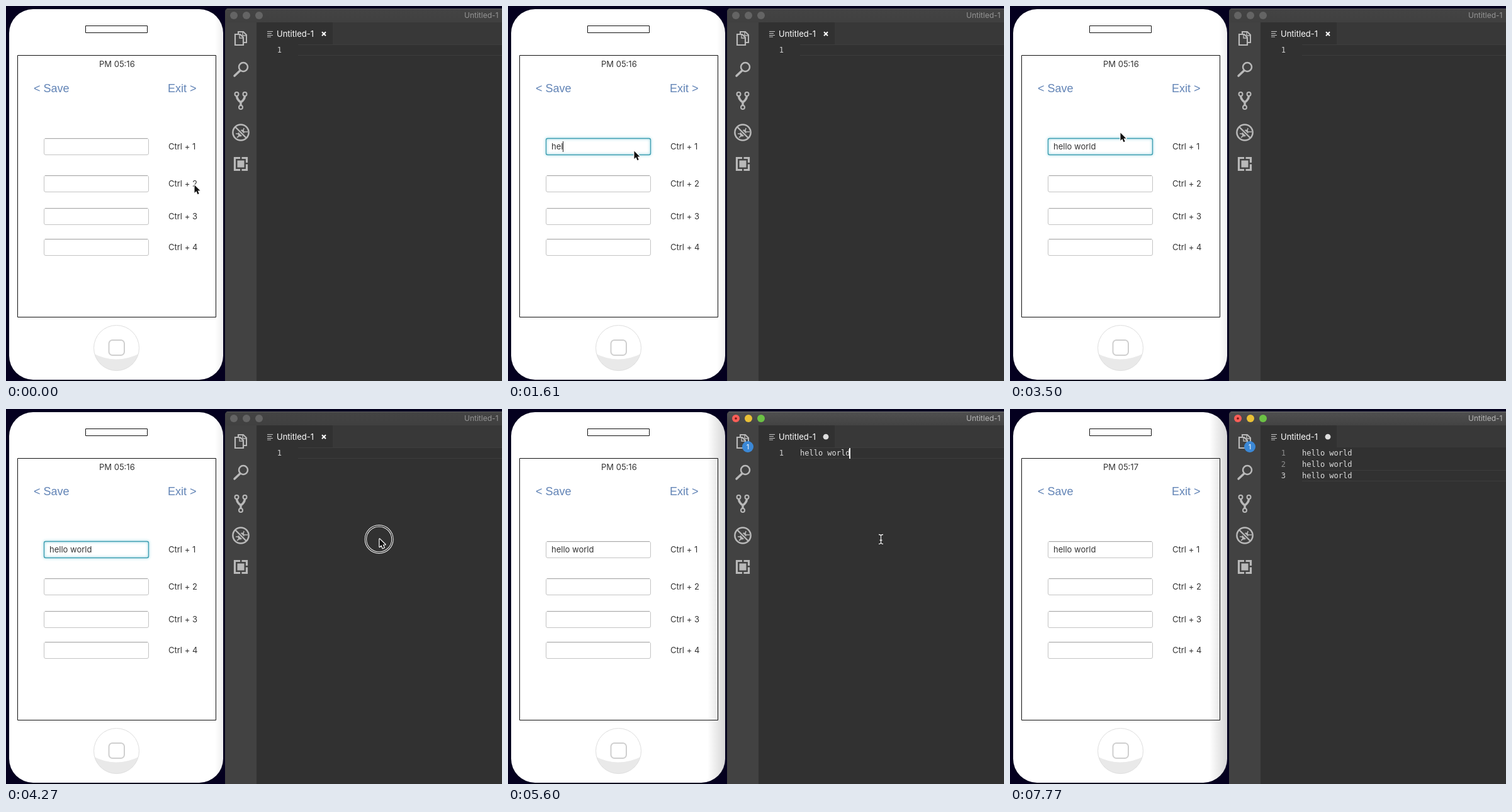
Write an HTML page with a canvas that moves like this. It is 788 px wide and 596 px high and loops after 7.84 s.

```html
<!DOCTYPE html>
<html lang="en">
<head>
<meta charset="utf-8">
<title>Text macro demo</title>
<style>
  html, body { margin: 0; width: 100%; height: 100%; overflow: hidden; background: #04001f; }
  canvas { display: block; }
</style>
</head>
<body>
<canvas id="stage" width="788" height="596"></canvas>
<script>
const ctx = document.getElementById('stage').getContext('2d');
const LOOP = 7840, STEP = 70;
const PHRASE = 'hello world';
const UI = 'Inter, sans-serif', LINK = '"Liberation Sans", sans-serif', MONO = '"DejaVu Sans Mono", monospace';
const FIELD_TOPS = [210, 269, 321, 370];
const KEY_TIMES = [1120, 1470, 1610, 1680, 1750, 1890, 2100, 2170, 2380, 2450, 2660];
const LINE_STARTS = [5180, 6300, 7350], TYPE_TIME = 490;
const ENTERS = [5810, 7000];
const FOCUS = 490, ACTIVATE = 4340;

function fill(color) { ctx.fillStyle = color; ctx.fill(); }
function stroke(color, width = 1) { ctx.strokeStyle = color; ctx.lineWidth = width; ctx.stroke(); }
function box(color, x, y, w, h) { ctx.fillStyle = color; ctx.fillRect(x, y, w, h); }
function round(x, y, w, h, r) { ctx.beginPath(); ctx.roundRect(x, y, w, h, r); }
function circle(x, y, r) { ctx.beginPath(); ctx.arc(x, y, r, 0, 7); }
function shape(d, color, width) {
  const p = new Path2D(d);
  if (width) { ctx.strokeStyle = color; ctx.lineWidth = width; ctx.stroke(p); }
  else { ctx.fillStyle = color; ctx.fill(p); }
}
function text(s, x, y, color, size, family = UI, align = 'left') {
  ctx.font = `${size}px ${family}`;
  ctx.textAlign = align;
  ctx.fillStyle = color;
  ctx.fillText(s, x, y);
}

function drawPhone(t) {
  const active = t >= ACTIVATE;
  ctx.save();
  round(5, 5, 340, 589, 38);
  fill('#fff');
  ctx.clip();
  const left = active ? 317 : 332;
  const shade = ctx.createLinearGradient(left, 0, 346, 0);
  shade.addColorStop(0, 'rgba(0,0,0,0)');
  shade.addColorStop(1, active ? 'rgba(0,0,0,.17)' : 'rgba(0,0,0,.07)');
  box(shade, left, 5, 30, 589);
  ctx.restore();

  ctx.beginPath();
  ctx.rect(126.5, 31.5, 98, 11);
  ctx.rect(18.5, 78.5, 315, 416);
  stroke('#111');

  ctx.save();
  circle(175.5, 543.5, 36);
  ctx.clip();
  shape('M138 552Q175 571 213 552V582H138Z', '#e9e9e9');
  ctx.restore();
  circle(175.5, 543.5, 36);
  stroke('#dedede');
  round(163.5, 531, 24.5, 24, 5.5);
  stroke('#cfcfcf', 2);

  text(t < ENTERS[0] ? 'PM 05:16' : 'PM 05:17', 148, 97, '#333', 13);
  text('< Save', 44, 137, '#6284b6', 18, LINK);
  text('Exit >', 257, 137, '#6284b6', 18, LINK);
  FIELD_TOPS.forEach((y, i) => {
    drawField(y, i === 0 && t >= FOCUS && t < ACTIVATE);
    text('Ctrl + ' + (i + 1), 258, y + 18, '#333', 13);
  });

  const typed = PHRASE.slice(0, KEY_TIMES.filter(k => t >= k).length);
  text(typed, 69, 228, '#333', 13);
  if (t >= 700 && t < 3220) box('#222', Math.round(69 + ctx.measureText(typed).width), 215, 1, 17);
}

function drawField(y, focused) {
  ctx.save();
  round(60.5, y + .5, 166, 26, 2.5);
  if (focused) {
    ctx.shadowColor = '#6cc5d4';
    ctx.shadowBlur = 4;
    stroke('#3f9fb2', 1.4);
  } else {
    stroke('#c4c4c4');
    box('#aaa', 62, y, 163, 1);
    box('#eee', 61, y + 1, 165, 1);
  }
  ctx.restore();
}

function drawIcons() {
  const c = '#b9b9b9', bar = '#424242';
  // files
  shape('M369 44V41H377L382 46V58H378', c, 2);
  shape('M364 45H372L377 50V62H364Z', c, 2.2);
  shape('M371 45V51H377M376 41V47H382', c, 1.4);
  // search
  circle(377, 97, 7);
  stroke(c, 2.5);
  ctx.lineCap = 'round';
  shape('M371.5 103L363 111', c, 3.5);
  ctx.lineCap = 'butt';
  // branches
  shape('M366.5 143Q367 149 373 153Q379 149 379.5 143M373 151V159', c, 3.4);
  for (const [x, y] of [[366.5, 140], [379.5, 140], [373, 161]]) {
    circle(x, y, 3);
    fill(bar);
    stroke(c, 2);
  }
  // debug
  shape('M366 196L370 199M365 203H370M367 209L371 206M378 194L377 198M384 200H378M380 208L376 205', c, 1.6);
  ctx.beginPath();
  ctx.ellipse(373.5, 202, 4.5, 6, .7, 0, 7);
  fill(c);
  shape('M364 192L382 210', bar, 5);
  shape('M364 192L382 210', c, 2.4);
  circle(373, 201, 12.6);
  stroke(c, 2.5);
  // extensions
  shape('M363.5 241.5H382.5V260.5H363.5Z', c, 3.2);
  box(c, 367.5, 245.5, 11, 11);
  box(bar, 372, 239, 2.5, 5);
  box(bar, 380, 249, 5, 2.5);
  box(bar, 372, 258, 2.5, 5);
}

function drawEditor(t) {
  const active = t >= ACTIVATE, dirty = t >= LINE_STARTS[0];
  ctx.save();
  round(348, 4, 460, 620, 5);
  ctx.clip();
  box('#313131', 348, 4, 440, 592);
  const bar = ctx.createLinearGradient(0, 4, 0, 26);
  bar.addColorStop(0, active ? '#505050' : '#444');
  bar.addColorStop(1, active ? '#434343' : '#404040');
  box(bar, 348, 4, 440, 22);
  box(active ? '#707070' : '#5c5c5c', 348, 4, 440, 1);
  box('#424242', 348, 26, 50, 570);
  box('#383838', 519, 26, 269, 35);
  ctx.restore();

  ['#fb5e57', '#eac136', '#6bc145'].forEach((color, i) => {
    circle(362 + i * 20, 15, 6);
    fill(active ? color : '#646464');
  });
  if (dirty) { circle(362, 15, 1.8); fill('#7c1512'); }
  text('Untitled-1', 728, 19, active ? '#b8b8b8' : '#969696', 12);

  drawIcons();
  if (dirty) {
    circle(381, 60, 9);
    fill('#3b88d6');
    text('1', 381, 64, '#fff', 11, UI, 'center');
  }
  shape('M415 40.5H424M415 43.5H422M415 46.5H424M415 49H421', '#c8c8c8', 1.1);
  text('Untitled-1', 430, 49, '#fff', 13);
  if (dirty) { circle(505, 44.2, 4.4); fill('#dedede'); }
  else shape('M502 41.2L508 47.2M508 41.2L502 47.2', '#fff', 2);

  const row = ENTERS.filter(e => t >= e).length;
  box('#3d3d3d', 464, 61 + row * 18, 324, 1);
  box('#3d3d3d', 464, 78 + row * 18, 324, 1);
  for (let i = 0; i <= row; i++) {
    const y = 74 + i * 18;
    const part = (t - LINE_STARTS[i] + STEP) / TYPE_TIME;
    const line = PHRASE.slice(0, Math.round(Math.max(0, Math.min(1, part)) * PHRASE.length));
    text(i + 1, 438, y, i === row ? '#d0d0d0' : '#8c8c8c', 12, MONO, 'right');
    text(line, 464, y, '#dedede', 12, MONO);
    const lit = active && (t < 4900 || dirty) && t < 7770;
    if (i === row && lit) box('#f0f0f0', 464 + Math.floor(ctx.measureText(line).width) - (line ? 1 : 0), y - 12, 2, 17);
  }
}

// start time, end time, from, to
const MOVES = [
  [0, 490, [299, 284], [200, 230]],
  [3360, 3500, [200, 230], [175, 201]],
  [3500, 4200, [175, 201], [593, 206]]
];
function pointerAt(t) {
  const [start, end, a, b] = MOVES.findLast(m => t >= m[0]);
  const u = Math.min(1, (t - start) / (end - start));
  const k = u * u * (3 - 2 * u);
  return a.map((v, i) => v + (b[i] - v) * k);
}

function drawPointer(t) {
  const [x, y] = pointerAt(t);
  if ((t >= 490 && t < 770) || (t >= 4270 && t < 4410)) {
    circle(x - .3, y + (t < 1000 ? -.5 : 1), 21.3);
    stroke('#fff', 3.4);
    stroke(t < 1000 ? '#111' : '#2a2a2a', 1.5);
  }
  if (t >= ENTERS[0]) return;
  if (t >= 4410) {
    const beam = 'M589 199.5Q592.5 199.5 592.5 202V212Q592.5 214.5 589 214.5M596 199.5Q592.5 199.5 592.5 202M592.5 212Q592.5 214.5 596 214.5M590.5 208.5H594.5';
    shape(beam, '#222', 3);
    shape(beam, '#f2f2f2', 1.3);
    return;
  }
  ctx.save();
  ctx.translate(x, y);
  ctx.lineJoin = 'round';
  const arrow = 'M.5 .5V13L3.4 10.3L5.5 15.2L7.7 14.2L5.6 9.4H9.5Z';
  shape(arrow, '#fff', 2.4);
  shape(arrow, '#111');
  ctx.restore();
}

function draw(now) {
  const t = Math.floor(now % LOOP / STEP) * STEP;
  box('#04001f', 0, 0, 788, 596);
  drawPhone(t);
  drawEditor(t);
  drawPointer(t);
  requestAnimationFrame(draw);
}
requestAnimationFrame(draw);
</script>
</body>
</html>
```
